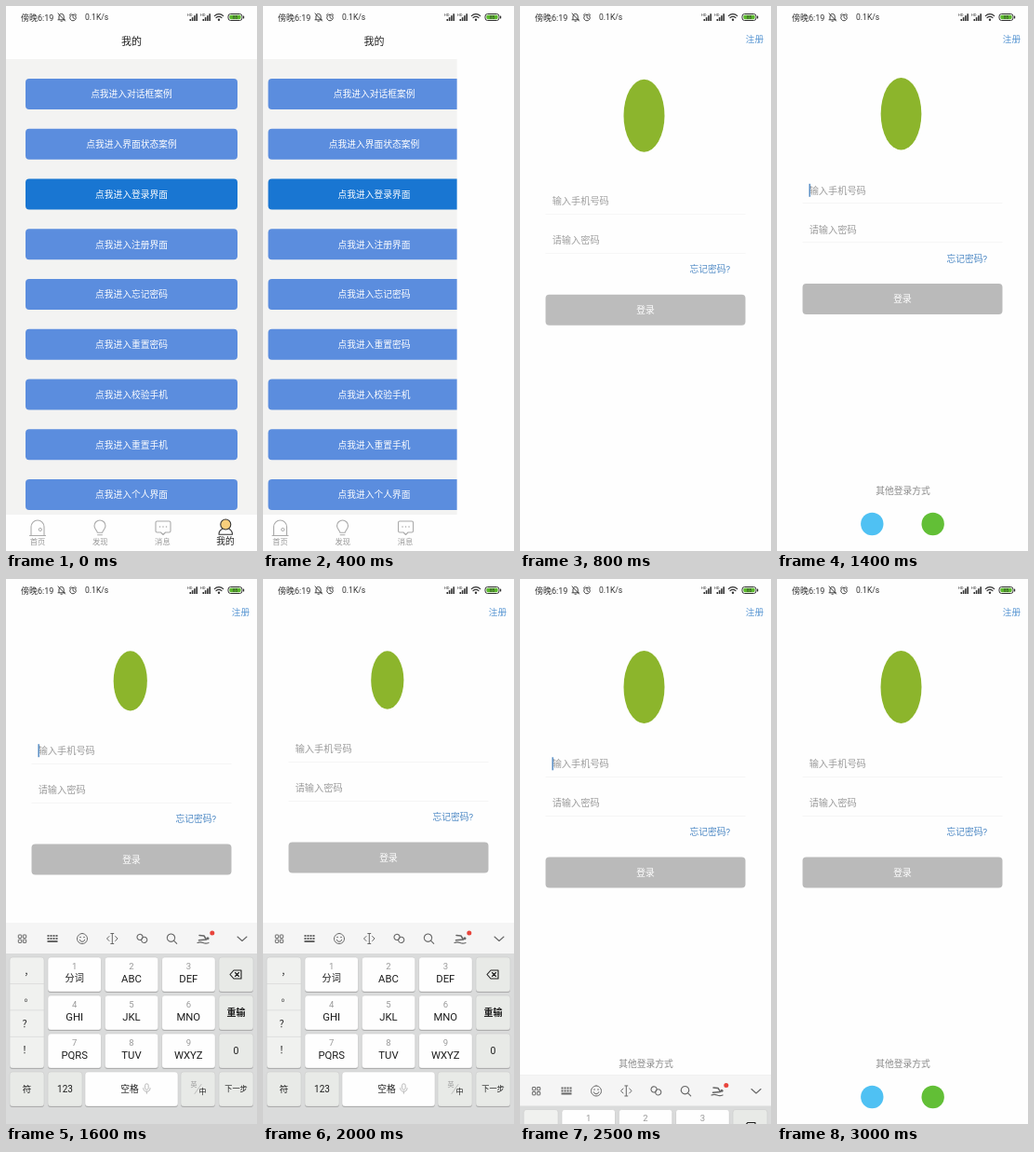
An HTML page that plays this animation: 270 px wide and 585 px high, repeating every 3.1 s.

```html
<!DOCTYPE html>
<html lang="zh-CN">
<head>
<meta charset="utf-8">
<style>
html, body { margin: 0; width: 100%; height: 100%; overflow: hidden; background: #fefefe; }
svg { display: block; width: 100vw; height: 100vh; }
text { font-family: Roboto, "Noto Sans CJK SC", "Noto Sans CJK", sans-serif; white-space: pre; }
.i { fill: none; stroke-linecap: round; stroke-linejoin: round; }
</style>
</head>
<body>
<svg id="stage" viewBox="0 0 270 585" preserveAspectRatio="none"></svg>
<script>
const rect = (x, y, w, h, fill, r = 0, extra = '') =>
  `<rect x="${x}" y="${y}" width="${w}" height="${h}" rx="${r}" fill="${fill}" ${extra}/>`;
const dot = (x, y, r, fill, extra = '') => `<circle cx="${x}" cy="${y}" r="${r}" fill="${fill}" ${extra}/>`;
const line = (d, color, w = 1) => `<path class="i" d="${d}" stroke="${color}" stroke-width="${w}"/>`;
// y is the visual middle of the text
const text = (s, x, y, size, fill, anchor = 'middle', weight = 400) =>
  `<text x="${x}" y="${y + size * .37}" font-size="${size}" fill="${fill}" text-anchor="${anchor}" font-weight="${weight}">${s}</text>`;
const group = (id, body) => `<g id="${id}">${body}</g>`;

function statusBar() {
  const c = '#333';
  let s = text('傍晚6:19', 16, 12.2, 9, c, 'start') + text('0.1K/s', 85, 12.2, 8.6, c, 'start');
  s += line('M57 14.5V11a2.6 2.6 0 0 1 5.2 0v3.5M56 14.8h7.4M59 16.2h1.4M56 8l7.5 8', c, .9);
  s += line('M72 9.2a3.3 3.3 0 1 0 .01 0M72 10.6v2l1.4.8M68.3 10l1.8-1.7M75.7 10l-1.8-1.7', c, .9);
  for (const x of [195, 209]) {
    s += text('HD', x + 2.6, 9.5, 4.2, c);
    for (let k = 0; k < 4; k++) s += rect(x + 2.5 + k * 2.3, 14 - k * 1.9, 1.6, 2 + k * 1.9, c);
  }
  s += line('M224.3 10.6a6.6 6.6 0 0 1 9.4 0M226 12.6a4.2 4.2 0 0 1 6 0', c, 1.2) + dot(229, 14.8, 1.2, c);
  s += rect(239, 8.5, 15, 7, '#fff', 2.6, `stroke="${c}"`);
  s += rect(240.4, 9.8, 12.2, 4.4, '#59b72a', 1.4) + rect(255, 10.5, 1.2, 3, c, .5);
  return s + text('85', 246.5, 12, 4.6, c);
}

function listPage() {
  const names = ['对话框案例', '界面状态案例', '登录界面', '注册界面', '忘记密码', '重置密码', '校验手机', '重置手机', '个人界面'];
  let s = rect(0, 0, 270, 585, '#fefefe') + rect(0, 57, 270, 489, '#f3f3f2') + text('我的', 135, 38, 11, '#222');
  names.forEach((n, k) => {
    const y = 78 + k * 53.75;
    s += rect(21, y, 228, 33, k == 2 ? '#1976d2' : '#5b8dde', 4) + text('点我进入' + n, 135, y + 16.7, 9.75, '#fff');
  });
  const g = '#aaa';
  s += rect(0, 546, 270, 39, '#fefefe');
  s += line('M27 568.5V559a7 7 0 0 1 14 0v9.5zM25.5 568.5h17', g, 1.1) + dot(36.8, 562, 1.6, 'none', `stroke="${g}"`);
  s += line('M98.3 565.2c0-2.2-3.3-3.5-3.3-7.2a6 6 0 0 1 12 0c0 3.7-3.3 5-3.3 7.2zM98.6 567.7h4.8', g, 1.1);
  s += line('M162.5 553h13a1.5 1.5 0 0 1 1.5 1.5v9a1.5 1.5 0 0 1-1.5 1.5h-4l-2.5 2.5-2.5-2.5h-4a1.5 1.5 0 0 1-1.5-1.5v-9a1.5 1.5 0 0 1 1.5-1.5z', g, 1.1);
  for (const x of [165.5, 169, 172.5]) s += dot(x, 559, .8, g);
  s += dot(236.3, 556.5, 5.5, '#f8cf7c', 'stroke="#333" stroke-width="1.1"');
  s += line('M232.5 561.5c-2.3 1-3.5 2.8-3.5 5.7h14.5c0-2.9-1.2-4.7-3.5-5.7', '#333', 1.1);
  ['首页', '发现', '消息'].forEach((n, k) => { s += text(n, 34 + k * 67.2, 575, 8.3, '#999'); });
  return s + text('我的', 236, 574.5, 9.7, '#222');
}

function form() {
  return text('输入手机号码', 34.7, 198.3, 10.2, '#9b9b9b', 'start') +
    text('请输入密码', 34.7, 240.3, 10.2, '#9b9b9b', 'start') +
    rect(27.5, 212, 215, .6, '#f0f0f0') + rect(27.5, 254, 215, .6, '#f0f0f0') +
    text('忘记密码?', 182.5, 271.7, 9.75, '#4c88c4', 'start') +
    rect(27.5, 298.5, 215, 33, '#bababa', 4) + text('登录', 135, 315.2, 9.75, '#fff') +
    rect(34.5, 191.3, 1.3, 14, '#3e7cbc', 0, 'id="caret"');
}

function toolbar() {
  const c = '#666';
  let s = '';
  for (const x of [13.3, 18.3]) for (const y of [382, 387])
    s += rect(x, y, 3.4, 3.4, 'none', .5, `stroke="${c}"`);
  for (let r = 0; r < 2; r++) for (let k = 0; k < 4; k++) s += rect(44.5 + k * 3, 382 + r * 3, 2, 2, c);
  s += rect(44.5, 388, 11, 2, c);
  s += line('M82 380.5a5.5 5.5 0 1 0 .01 0M79.3 387.3a2.8 2.8 0 0 0 5.4 0', c) + dot(80, 384.5, .8, c) + dot(84, 384.5, .8, c);
  s += line('M114.3 381v10M112.8 380.5h3M112.8 391.5h3M111 383.5l-2.5 2.5 2.5 2.5M117.6 383.5l2.5 2.5-2.5 2.5', c);
  s += line('M146.3 386.6a3.1 3.1 0 1 1 .9-2.2q0 1.6-1 1.6M146.500 385.200a3.1 3.1 0 1 1-.9 2.200q0-1.600 1-1.600'.replace(/00\b/g, ''), c, 1.1);
  s += line('M177.5 381a4.2 4.2 0 1 0 .01 0M180.7 388.4l3 3', c, 1.1);
  s += line('M208 382.5l5 .5 2.5 4-8 .8', c, 1.5) + line('M206 390.5q3-1.2 6 0t6 0', c, 1.2) + dot(217, 385.8, 1.5, c);
  return s + dot(221.8, 380, 2.5, '#e8453c') + line('M249 384l5 4.5 5-4.5', c, 1.1);
}

function keyboard() {
  const dark = '#1c1c1c', side = '#f0f1ef', grey = '#e8eae7', white = '#fefefe';
  const key = (x, y, w, h, fill) => rect(x, y + .9, w, h, '#a4a5a5', 3.2) +
    rect(x, y, w, h, fill, 3, 'stroke="#c6c7c7" stroke-width=".5"');
  let s = rect(0, 369, 270, 240, '#dadbdb') + rect(0, 369, 270, 33, '#f5f5f5') + toolbar();
  s += key(4, 406, 37, 119, side);
  ['，', '。', '？', '！'].forEach((m, k) => {
    s += text(m, k < 2 ? 24.5 : 22.5, 421 + k * 28, 10, dark, 'middle', 500);
    if (k) s += rect(4, 406 + k * 28.3, 37, .6, '#d2d2d2');
  });
  ['分词', 'ABC', 'DEF', 'GHI', 'JKL', 'MNO', 'PQRS', 'TUV', 'WXYZ'].forEach((n, k) => {
    const x = 45 + k % 3 * 61.3, y = 406 + Math.floor(k / 3) * 41;
    s += key(x, y, 57.5, 37, white) + text(k + 1, x + 28.7, y + 9.5, 9.5, '#999') +
      text(n, x + 28.7, y + 22.5, k ? 11.3 : 10.2, dark);
  });
  for (let k = 0; k < 3; k++) s += key(229, 406 + k * 41, 37, 37, grey);
  s += line('M241 424.5l4-4.5h8v9h-8zM246.5 422.5l4 4M250.5 422.5l-4 4', dark, 1.1);
  s += text('重输', 247.5, 465.5, 10, dark, 'middle', 700) + text('0', 247.5, 506.5, 10.5, dark);
  s += key(4, 529, 37, 37, grey) + text('符', 22.5, 547, 9.5, dark);
  s += key(45, 529, 37, 37, grey) + text('123', 63.5, 547, 10, dark);
  s += key(85, 529, 100, 37, white) + text('空格', 133, 547, 9.75, dark);
  s += rect(149.6, 541.8, 3.6, 6.4, 'none', 1.8, 'stroke="#aaa" stroke-width=".8"');
  s += line('M147.7 546.5a3.7 3.7 0 0 0 7.4 0M151.4 550.3v2', '#aaa', .8);
  s += key(188, 529, 37, 37, grey) + text('英', 202, 542, 7, '#999') + text('中', 211.5, 550, 8, dark);
  s += line('M203 552.5l7-10', '#aaa', .7);
  return s + key(229, 529, 37, 37, grey) + text('下一步', 247.5, 547, 8.2, dark, 'middle', 500);
}

stage.innerHTML =
  group('list', listPage()) +
  group('page', rect(0, 0, 270, 585, '#fefefe')) +
  group('register', text('注册', 262, 35.8, 9.6, '#5594d2', 'end')) +
  group('logo', '<ellipse cx="133.5" cy="116" rx="22" ry="39" fill="#8cb52c"/>') +
  group('body', form()) +
  group('other', text('其他登录方式', 135.5, 520.5, 9.75, '#888')) +
  group('icons', dot(102.3, 556, 12.2, '#4fc1f3') + dot(167.7, 556, 12.2, '#62bf36')) +
  group('keys', keyboard()) +
  group('status', statusBar());

const $ = id => document.getElementById(id);
const part = (t, start, len) => Math.min(1, Math.max(0, (t - start) / len));
const slow = u => 1 - (1 - u) ** 2;
const smooth = u => (1 - Math.cos(Math.PI * u)) / 2;
const move = (id, x, y, more = '') => $(id).setAttribute('transform', `translate(${x} ${y})${more}`);

// rise from below while fading in; returns the remaining offset
function rise(id, t, start) {
  const u = slow(part(t, start, 270));
  $(id).setAttribute('opacity', u);
  return 280 * (1 - u);
}

function draw(t) {
  const slide = slow(part(t, 375, 215));
  move('list', -68 * slide, 0);
  move('page', 270 * (1 - slide), 0);

  const lift = smooth(part(t, 1367, 300)) - smooth(part(t, 2162, 300));
  const up = 15.9 * lift, scale = 1 - .2 * lift;
  move('register', 0, rise('register', t, 510));
  move('logo', 0, rise('logo', t, 552) - up, ` translate(135 158) scale(${scale}) translate(-135 -158)`);
  move('body', 0, rise('body', t, 585) - up);
  move('other', 0, rise('other', t, 690));
  move('icons', 0, rise('icons', t, 725));

  const shown = slow(part(t, 1405, 195)) - part(t, 2200, 346) ** 2;
  move('keys', 0, 216 * (1 - shown));
  $('caret').setAttribute('opacity', t >= 1295 && (t - 1295) % 1000 < 500 ? 1 : 0);
}

const begin = performance.now();
function tick() {
  draw((performance.now() - begin) % 3100);
  requestAnimationFrame(tick);
}
tick();
</script>
</body>
</html>
```
